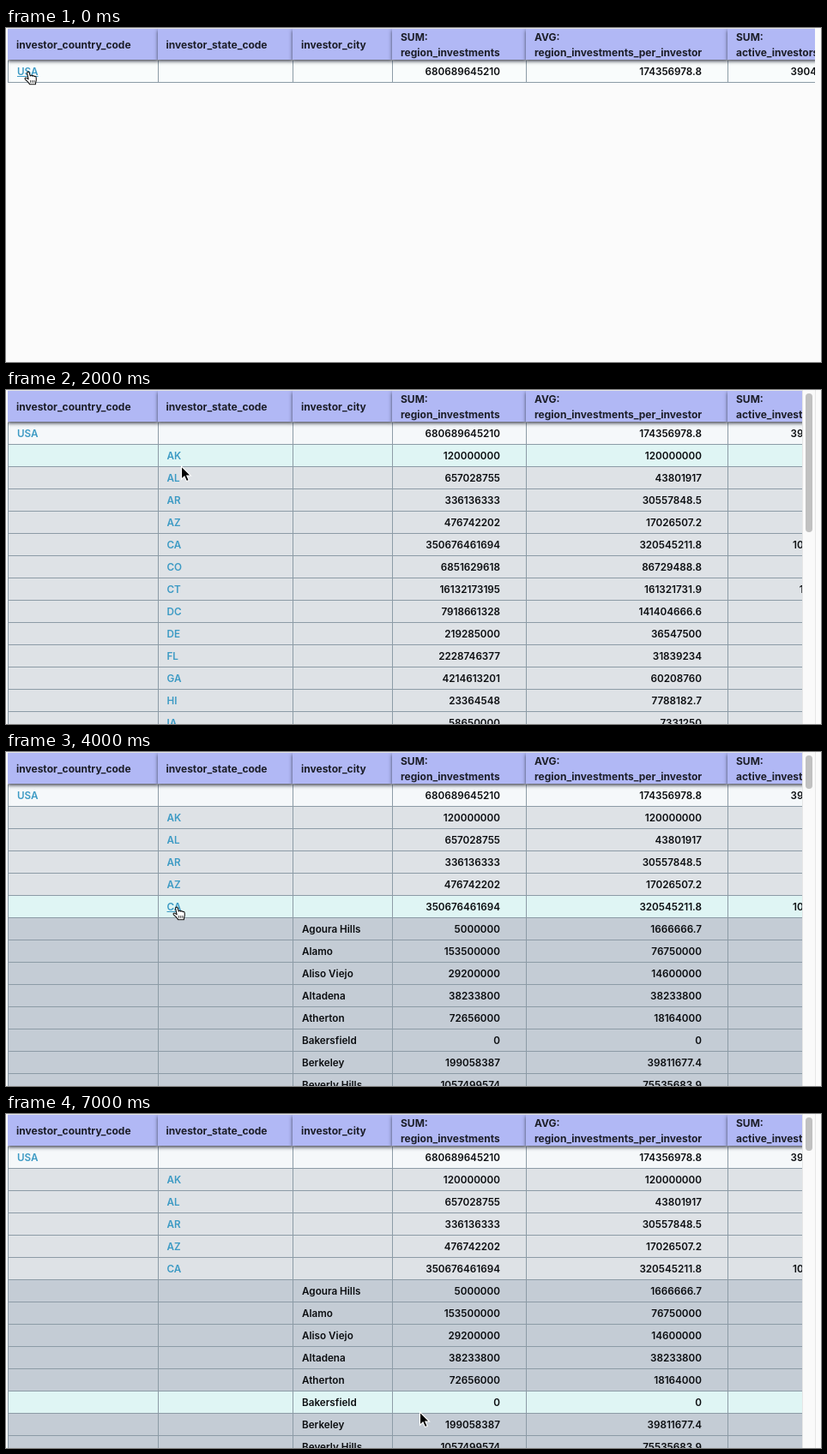
An HTML page for the animation above (7200 ms loop, 950 by 390 pixels).

```html
<!DOCTYPE html>
<html lang="en">
<head>
<meta charset="utf-8">
<title>Drill-down table</title>
<style>
  html, body { margin: 0; width: 100%; height: 100%; overflow: hidden; background: #fbfbfb; }
  #stage { position: relative; width: 950px; height: 390px; overflow: hidden; background: #fbfbfb;
    font: 600 11.7px/26px Inter, "Open Sans", sans-serif; color: #0b0d10; }
  #view { position: absolute; left: 2px; top: 0; height: 390px; overflow: hidden; }
  .row { position: relative; width: 973px; height: 26px; background: #f5f8fa; box-shadow: inset 0 -1px #8c9ba6; }
  .state { background: #dee2e6; }
  .city { background: #c4ccd5; }
  .plain { background: #f9fcfc; }
  .row.hover { background: #dff5f4; }
  .cell { position: absolute; top: 0; height: 26px; box-sizing: border-box; padding-left: 10px;
    border-left: 1px solid #8c9ba6; white-space: nowrap; }
  .num { padding-right: 30px; text-align: right; }
  .link { color: #3c9ac4; }
  .under { text-decoration: underline; }
  #rows { position: absolute; left: 0; top: 38px; }
  #head { position: absolute; left: 0; top: 1px; height: 37px; }
  .th { position: absolute; top: 0; height: 36px; display: flex; align-items: center; white-space: pre;
    box-sizing: border-box; padding: 2px 0 0 10px; font-size: 12px; font-weight: 700; line-height: 18.5px;
    color: #1c1e28; background: #b1b8f5; box-shadow: 0 2px 4px rgba(40, 45, 60, .85); }
  #bar { position: absolute; left: 928px; top: 0; width: 16px; height: 390px; box-sizing: border-box;
    background: #fafafa; border: solid #e6e6e6; border-width: 0 1px; }
  #thumb { position: absolute; left: 3px; top: 4px; width: 8px; border-radius: 4px; background: #c1c1c1; }
  .cursor { position: absolute; left: 0; top: 0; overflow: visible; }
</style>
</head>
<body>
<div id="stage">
  <div id="view"><div id="rows"></div><div id="head"></div></div>
  <div id="bar"><div id="thumb"></div></div>
  <svg id="arrow" class="cursor" width="14" height="20">
    <path d="M-.5 0V15.2L3 12L5.5 17.6L8.2 16.4L5.8 11H10.5Z" fill="#000" stroke="#fff" stroke-width="1.1"/>
  </svg>
  <svg id="hand" class="cursor" width="16" height="17">
    <path d="M-1.4 1.6C-1.8 .2 .4 -.5 1 .9L2.3 5C2.6 4 4.4 4 4.7 5.2C5.2 4.3 6.8 4.6 7 5.7C7.7 5 9.1 5.6 9.2 6.9
      C9.6 9.4 9.2 11 8.6 12.5L8.4 14.8H1.6C.8 12.6 -1.4 11.2 -3.6 8.8C-4.6 7.5 -3.2 6.6 -2 7.4L.1 8.9Z"
      fill="#fff" stroke="#111" stroke-width="1.1" stroke-linejoin="round"/>
    <path d="M2.6 10V13M4.7 10V13M6.8 10V13" stroke="#111" stroke-width=".8"/>
  </svg>
</div>
<script>
const LOOP = 7200, STEP = 200, PRESS = 600, OPEN_STATES = 800, OPEN_CITIES = 4000;
const ROW_TOP = 38, ROW_H = 26;
const EDGES = [0, 174.5, 332, 448, 604, 839, 973];
const HEADS = ['investor_country_code', 'investor_state_code', 'investor_city',
  'SUM:\nregion_investments', 'AVG:\nregion_investments_per_investor', 'SUM:\nactive_investors'];

// label | sum | average | investors
const COUNTRY = `USA|680689645210|174356978.8|3904`;
const STATES = `AK|120000000|120000000
AL|657028755|43801917
AR|336136333|30557848.5
AZ|476742202|17026507.2
CA|350676461694|320545211.8|1094`;
const CITIES = `Agoura Hills|5000000|1666666.7
Alamo|153500000|76750000
Aliso Viejo|29200000|14600000
Altadena|38233800|38233800
Atherton|72656000|18164000
Bakersfield|0|0
Berkeley|199058387|39811677.4
Beverly Hills|1057499574|75535683.9`;
const MORE = `CO|6851629618|86729488.8
CT|16132173195|161321731.9|100
DC|7918661328|141404666.6
DE|219285000|36547500
FL|2228746377|31839234
GA|4214613201|60208760
HI|23364548|7788182.7
IA|58650000|7331250`;

// time, x, y of the pointer tip
const PATH = [
  [0, 26, 51], [200, 26, 52], [1200, 26, 52], [1400, 42, 55], [1600, 98, 63], [1800, 170, 78],
  [2000, 205, 89], [2800, 207, 140], [3200, 199, 181], [4000, 199, 181], [4200, 205, 183],
  [5000, 323, 197], [6000, 393, 211], [6200, 397, 215], [6400, 397, 215],
  [6600, 422, 242], [7000, 483, 348], [7200, 483, 348]
];

const $ = id => document.getElementById(id);

function add(parent, cls, text = '') {
  const el = document.createElement('div');
  el.className = cls;
  el.textContent = text;
  return parent.appendChild(el);
}

function place(el, i) {
  el.style.left = EDGES[i] + 'px';
  el.style.width = EDGES[i + 1] - EDGES[i] + 'px';
}

function addRows(text, kind, level) {
  return text.split('\n').map(line => {
    const [label, ...nums] = line.split('|');
    const el = add($('rows'), 'row ' + kind);
    let link = null;
    for (let i = 0; i < 6; i++) {
      const value = i === level ? label : nums[i - 3] || '';
      const cell = add(el, i > 2 ? 'cell num' : 'cell', value);
      place(cell, i);
      if (i === level && level < 2) {
        cell.classList.add('link');
        link = cell;
      }
    }
    return { el, link, level };
  });
}

HEADS.forEach((text, i) => place(add($('head'), 'th', text), i));
const country = addRows(COUNTRY, 'country', 0);
const states = addRows(STATES, 'state', 1);
const cities = addRows(CITIES, 'city', 2);
const more = addRows(MORE, 'state', 1);
const all = [...country, ...states, ...cities, ...more];
const views = [country, [...country, ...states, ...more], [...country, ...states, ...cities]];

function pointerAt(t) {
  const i = PATH.findIndex(p => p[0] > t);
  const [t0, x0, y0] = PATH[i - 1], [t1, x1, y1] = PATH[i];
  const k = (t - t0) / (t1 - t0);
  return [x0 + (x1 - x0) * k, y0 + (y1 - y0) * k];
}

function overLink(row, x) {
  if (!row || !row.link) return false;
  return row.level ? x >= 187 && x < 204 : x >= 13 && x < 37;
}

function draw(t) {
  const stage = (t >= OPEN_STATES) + (t >= OPEN_CITIES);
  const shown = views[stage];
  const [x, y] = pointerAt(t);
  const target = shown[Math.floor((y - ROW_TOP) / ROW_H)];
  const onLink = overLink(target, x);

  all.forEach(row => {
    row.el.style.display = shown.includes(row) ? '' : 'none';
    row.el.classList.toggle('hover', t >= PRESS && row === target);
    if (row.link) row.link.classList.toggle('under', onLink && row === target);
  });
  country[0].el.classList.toggle('plain', stage === 0);

  $('view').style.width = (stage ? 926 : 941) + 'px';
  $('bar').style.display = stage ? '' : 'none';
  $('thumb').style.height = (stage === 2 ? 39 : 162) + 'px';
  $('arrow').style.display = onLink ? 'none' : '';
  $('hand').style.display = onLink ? '' : 'none';
  $(onLink ? 'hand' : 'arrow').style.transform = `translate(${x}px, ${y}px)`;
}

let last = -1;
function tick() {
  const t = Math.floor(performance.now() % LOOP / STEP) * STEP;
  if (t !== last) draw(last = t);
  requestAnimationFrame(tick);
}
tick();
</script>
</body>
</html>
```
